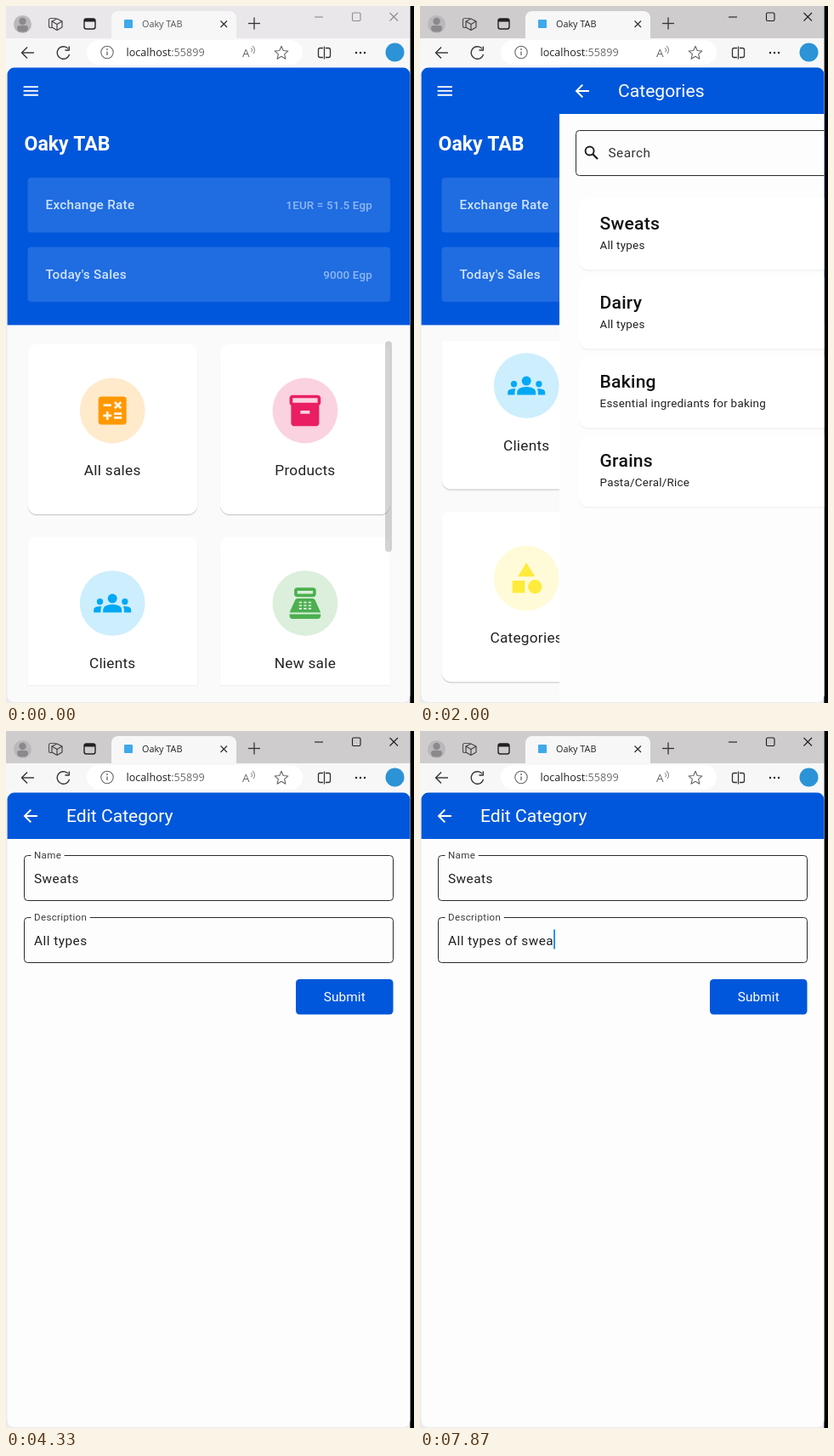
Animation, 480 px wide and 820 px high, one loop 8000 ms. Source, as an HTML page with a canvas:

```html
<!DOCTYPE html>
<html lang="en">
<head>
<meta charset="utf-8">
<title>Oaky TAB</title>
<style>
html, body { margin: 0; width: 100%; height: 100%; overflow: hidden; background: #000; }
canvas { display: block; width: 480px; height: 820px; }
</style>
</head>
<body>
<canvas id="stage"></canvas>
<script>
const LOOP = 8000, STEP = 1000 / 15;
const BLUE = '#0157db', PAGE = '#fdfdfd', INK = '#1f1f22';
const APP = { x: 1.6, y: 72.6, w: 473.8, h: 746.4 };
const SHOP = 'Oaky TAB';

const canvas = document.getElementById('stage');
const dpr = window.devicePixelRatio || 1;
canvas.width = 480 * dpr;
canvas.height = 820 * dpr;
const c = canvas.getContext('2d');

// ---------- helpers ----------
function rect(x, y, w, h, fill) {
  c.fillStyle = fill;
  c.fillRect(x, y, w, h);
}
function round(x, y, w, h, r, fill, stroke, lw = 1) {
  c.beginPath();
  c.roundRect(x, y, w, h, r);
  if (fill) { c.fillStyle = fill; c.fill(); }
  if (stroke) { c.strokeStyle = stroke; c.lineWidth = lw; c.stroke(); }
}
function disc(x, y, r, fill) {
  c.beginPath();
  c.arc(x, y, r, 0, 7);
  c.fillStyle = fill;
  c.fill();
}
function arc(x, y, r, a, b, color, lw) {
  c.beginPath();
  c.arc(x, y, r, a, b);
  c.strokeStyle = color;
  c.lineWidth = lw;
  c.stroke();
}
function line(color, lw, ...p) {
  c.beginPath();
  c.moveTo(p[0], p[1]);
  for (let i = 2; i < p.length; i += 2) c.lineTo(p[i], p[i + 1]);
  c.strokeStyle = color;
  c.lineWidth = lw;
  c.stroke();
}
function text(s, x, y, size, color, { gap = 0, weight = 400, align = 'left', font = 'Roboto' } = {}) {
  c.font = `${weight} ${size}px ${font}, sans-serif`;
  c.letterSpacing = gap + 'px';
  c.textAlign = align;
  c.fillStyle = color;
  c.fillText(s, x, y);
  return c.measureText(s).width;
}
const clamp = v => Math.min(1, Math.max(0, v));
const slide = (t, start) => Math.round(473 * (1 - clamp((t - start) / 330)) ** 3);
function track(t, keys) {
  let [t0, v0] = keys[0];
  for (const [t1, v1] of keys) {
    if (t < t1) return t1 > t0 ? v0 + (v1 - v0) * (t - t0) / (t1 - t0) : v0;
    t0 = t1; v0 = v1;
  }
  return v0;
}

// ---------- icons on a 24 unit grid ----------
const box24 = new Path2D('M20 2H4c-1 0-2 .9-2 2v3c0 .7.4 1.3 1 1.7V20c0 1.1 1.1 2 2 2h14c.9 0 2-.9 2-2V8.7c.6-.4 1-1 1-1.7V4c0-1.1-1-2-2-2zm-5 12H9v-2h6v2zm5-7H4V4h16v3z');
const sidePerson = new Path2D('M4 13a2 2 0 1 0 0-4a2 2 0 0 0 0 4zm1.1 1.1c-1.3-.2-2.7-.1-3.9.5C.5 14.9 0 15.6 0 16.4V18h4.5v-1.6c0-.8.2-1.6.6-2.3z');
const shoulders = new Path2D('M12 12.75c1.6 0 3.1.4 4.24.9c1.1.5 1.76 1.56 1.76 2.73V18H6v-1.6c0-1.2.7-2.26 1.76-2.73c1.17-.5 2.6-.9 4.24-.9z');
const tillBody = new Path2D('M18.5 10.2C18.2 9.5 17.5 9 16.7 9H7.3c-.8 0-1.5.5-1.8 1.2L2 18h20z');
const shapes24 = new Path2D('M12 2l-5.5 9h11zM3 13.5h8v8H3z');
const icons = {
  calc() {
    const w = '#fff3e2';
    round(3, 3, 18, 18, 2, c.fillStyle);
    line(w, 1.5, 6.25, 8.47, 11.25, 8.47);
    line(w, 1.5, 13.5, 6.5, 17.5, 10.5);
    line(w, 1.5, 17.5, 6.5, 13.5, 10.5);
    line(w, 1.5, 6, 15.25, 11.5, 15.25);
    line(w, 1.5, 8.75, 12.5, 8.75, 18);
    line(w, 1.5, 13, 14, 18, 14);
    line(w, 1.5, 13, 16.5, 18, 16.5);
  },
  box() { c.fill(box24, 'evenodd'); },
  people() {
    c.fill(sidePerson);
    c.save();
    c.translate(24, 0);
    c.scale(-1, 1);
    c.fill(sidePerson);
    c.restore();
    c.fill(shoulders);
    disc(12, 9, 3, c.fillStyle);
  },
  till() {
    const color = c.fillStyle;
    round(6, 3, 12, 4, 1, null, color, 2);
    c.fill(tillBody);
    round(2, 19, 20, 3, [0, 0, 2, 2], color);
    for (let i = 0; i < 9; i++)
      round(8 + i % 3 * 3, 11 + (i / 3 | 0) * 2, 2, 1, .5, '#dbefdc');
  },
  shapes() {
    c.fill(shapes24);
    disc(17.5, 17.5, 4.5, c.fillStyle);
  }
};
function icon(name, x, y, size, color) {
  c.save();
  c.translate(x - size / 2, y - size / 2);
  c.scale(size / 24, size / 24);
  c.fillStyle = color;
  icons[name]();
  c.restore();
}

// ---------- browser window ----------
function browser(active) {
  const ink = active ? '#1d1d1d' : '#8d8b8d';
  const bar = active ? '#cfccce' : '#e9e7e9';
  const sans = { font: '"Open Sans"' };
  rect(0, 0, 475.4, 820, '#ececee');
  rect(0, 0, 475.4, 38, bar);
  rect(0, 38, 475.4, 42, '#f7f7f8');

  disc(19.5, 21.5, 10.5, '#bab8ba');
  disc(19.5, 18, 4.2, '#8b898b');
  round(13, 23, 13, 7.5, [4, 4, 6, 6], '#8b898b');

  c.lineJoin = 'round';
  round(50.5, 14.5, 9, 11, 2, null, '#555', 1.2);
  c.beginPath();
  c.moveTo(60, 15); c.lineTo(66, 18); c.lineTo(66, 25); c.lineTo(60, 28.5); c.lineTo(54, 25); c.lineTo(54, 18);
  c.closePath();
  c.fillStyle = bar;
  c.fill();
  c.strokeStyle = '#444';
  c.stroke();
  line('#444', 1.2, 54, 18, 60, 21.5, 66, 18);
  line('#444', 1.2, 60, 21.5, 60, 28);
  round(92, 15, 13, 12, 2.5, null, '#222', 1.4);
  rect(92, 15, 13, 3.5, '#222');

  round(124, 6, 147, 34, [8, 8, 0, 0], '#f7f7f8');
  round(139, 16, 10, 10, 1, '#3fa9ea');
  text(SHOP, 160, 25, 10.8, active ? '#222' : '#555', sans);
  line('#333', 1.2, 252.5, 17.5, 260, 25);
  line('#333', 1.2, 260, 17.5, 252.5, 25);
  line('#333', 1.3, 285, 20.5, 299, 20.5);
  line('#333', 1.3, 292, 13.5, 292, 27.5);

  line(ink, 1.1, 363, 13, 373, 13);
  round(407.5, 8, 9.5, 9.5, 1.5, null, ink, 1.1);
  line(ink, 1.1, 451.5, 8, 461, 17.5);
  line(ink, 1.1, 461, 8, 451.5, 17.5);

  line('#333', 1.4, 33, 55, 18.5, 55);
  line('#333', 1.4, 25, 48.5, 18.5, 55, 25, 61.5);
  arc(67.5, 55, 7.3, .25, 5.55, '#333', 1.4);
  line('#333', 1.4, 74.3, 47.5, 74.3, 52, 69.5, 52);

  round(95, 40, 254, 29, 14.5, '#fff');
  arc(119, 54.5, 7.2, 0, 7, '#666', 1.1);
  line('#666', 1.3, 119, 53.5, 119, 58);
  disc(119, 51, .9, '#666');
  const w = text('localhost', 141.5, 59, 12.6, '#222', sans);
  text(':55899', 141.5 + w, 59, 12.6, '#6a6a6a', sans);
  text('A', 278, 60, 13.5, '#666', sans);
  arc(286, 52, 3.5, -.9, .7, '#777', 1);
  arc(286, 52, 6.5, -.9, .7, '#777', 1);
  c.beginPath();
  for (let i = 0; i < 10; i++) {
    const a = -Math.PI / 2 + i * Math.PI / 5, r = i % 2 ? 3.8 : 8.3;
    c.lineTo(324 + r * Math.cos(a), 55.5 + r * Math.sin(a));
  }
  c.closePath();
  c.strokeStyle = '#666';
  c.lineWidth = 1.1;
  c.stroke();

  round(367.5, 49.5, 14, 11, 2, null, '#333', 1.3);
  rect(373, 48, 3, 14, '#f7f7f8');
  line('#333', 1.3, 374.5, 47.5, 374.5, 62.5);
  for (const x of [412, 417, 422]) disc(x, 55, 1.2, '#222');
  disc(457.5, 54.5, 11, '#2b93d6');
}

// ---------- home ----------
const tiles = [
  ['All sales', 'calc', '#ff9800', '#ffeacc'], ['Products', 'box', '#e91e63', '#fbd2e0'],
  ['Clients', 'people', '#03a9f4', '#cdeefd'], ['New sale', 'till', '#4caf50', '#dbefdc'],
  ['Categories', 'shapes', '#ffeb3b', '#fffbd8'], ['Iventory', 'box', '#9c27b0', '#ebd4ef']
];
function card(x, y, w, h, r, depth) {
  round(x, y + 2, w, h, r, `rgba(0,0,0,${depth / 4})`);
  round(x, y + 1, w, h, r, `rgba(0,0,0,${depth})`);
  round(x, y, w, h, r, '#fff');
}
function rateRow(y, label, value) {
  round(25.5, y, 426.5, 64.5, 4, '#206ce1');
  text(label, 46.5, y + 37, 15.36, '#d0e4fb', { weight: 500, gap: .24 });
  text(value, 431, y + 37, 13.44, '#8fb8f2', { weight: 500, gap: .16, align: 'right' });
}
function home(scroll, thumb) {
  rect(0, 72, 476, 748, '#fbfafb');
  rect(0, 72, 476, 303.4, BLUE);
  for (const y of [95.1, 99.9, 104.7]) line('#fff', 1.92, 20.6, y, 37.9, y);
  text(SHOP, 21.5, 170, 23.04, '#fff', { weight: 700 });
  rateRow(202, 'Exchange Rate', '1EUR = 51.5 Egp');
  rateRow(283.5, "Today's Sales", '9000 Egp');

  c.save();
  c.beginPath();
  c.rect(2, 394, 473, 405.5);
  c.clip();
  tiles.forEach(([label, name, color, tint], i) => {
    const x = 125.2 + i % 2 * 226.7, y = 476 + (i >> 1) * 226.6 - scroll;
    card(x - 100, y - 78, 200, 200, 11.5, .16);
    disc(x, y, 38.4, tint);
    icon(name, x, y, 44, color);
    text(label, x, y + 76, 17.28, '#222', { gap: .24, align: 'center' });
  });
  round(446, 394.3 + scroll * 157 / 256, 8, 248, 4, `rgba(0,0,0,${thumb})`);
  c.restore();
}

// ---------- inner pages ----------
function topBar(title) {
  rect(0, 72, 476, 748, PAGE);
  rect(0, 72, 476, 55, BLUE);
  c.lineJoin = 'miter';
  line('#fff', 2, 37, 100, 22.5, 100);
  line('#fff', 2, 29.3, 92.6, 22, 100, 29.3, 107.4);
  text(title, 71, 107, 21.12, '#fff');
}
const rows = [
  ['Sweats', 'All types'], ['Dairy', 'All types'],
  ['Baking', 'Essential ingrediants for baking'], ['Grains', 'Pasta/Ceral/Rice']
];
function categories() {
  topBar('Categories');
  round(21.5, 146.5, 434, 53, 4, null, '#2a2a2a');
  arc(37.6, 170.5, 5, 0, 7, '#1c1c1c', 1.9);
  line('#1c1c1c', 2.2, 41.2, 174.2, 47, 180);
  text('Search', 59.5, 178, 15.36, '#333', { gap: .48 });
  rows.forEach(([name, note], i) => {
    const y = 93 * i;
    card(25, 226 + y, 427, 84.5, 11, .05);
    text(name, 49.5, 263 + y, 21.12, '#111', { weight: 500, gap: .24 });
    text(note, 49.5, 286 + y, 13.44, '#222', { gap: .24 });
  });
}
function field(y, label, value, caret) {
  round(21.5, y + .5, 434, 53, 4, null, '#2a2a2a');
  c.font = '400 11.52px Roboto, sans-serif';
  c.letterSpacing = '.36px';
  rect(29.5, y - 1, c.measureText(label).width + 7, 4, PAGE);
  text(label, 33, y + 4, 11.52, '#3c3c40', { gap: .36 });
  const w = text(value, 33, y + 33, 15.36, INK, { gap: .48 });
  if (caret) rect(33 + w, y + 14.5, 1.9, 23, '#1c8fe3');
}
const typed = [[5930, ' '], [6330, 'o'], [6600, 'f'], [6800, ' '], [7200, 's'], [7530, 'w'], [7800, 'e'], [7867, 'a']];
function edit(t) {
  topBar('Edit Category');
  const extra = typed.filter(k => t >= k[0] - 4).map(k => k[1]).join('');
  field(146, 'Name', 'Sweats');
  field(219, 'Description', 'All types' + extra, t >= 5660);
  round(341, 292, 114.5, 41.5, 4.5, BLUE);
  text('Submit', 398.3, 318, 15.36, '#fff', { align: 'center', gap: .1 });
}

// ---------- timeline ----------
const scrollKeys = [[333, 0], [533, 14], [667, 66], [733, 149], [800, 225], [867, 256]];
const thumbKeys = [[67, .17], [267, .6], [1200, .6], [1467, .12]];

function page(x, draw) {
  c.save();
  c.translate(x, 0);
  c.beginPath();
  c.rect(x && 2, 72, 476, 748);
  c.clip();
  draw();
  c.restore();
}
function draw(now) {
  const t = Math.floor((now % LOOP + 4) / STEP) * STEP;
  c.setTransform(dpr, 0, 0, dpr, 0, 0);
  rect(0, 0, 480, 820, '#000');
  browser(t >= 60);
  c.save();
  c.beginPath();
  c.roundRect(APP.x, APP.y, APP.w, APP.h, 8);
  c.clip();
  const listX = slide(t, 1901), editX = slide(t, 3687);
  if (listX > 0) home(track(t, scrollKeys), track(t, thumbKeys));
  if (listX < 473 && editX > 0) page(listX, categories);
  if (editX < 473) page(editX, () => edit(t));
  c.restore();
}
let start;
function tick(now) {
  start ??= now;
  draw(now - start);
  requestAnimationFrame(tick);
}
draw(0);
requestAnimationFrame(tick);
</script>
</body>
</html>
```
